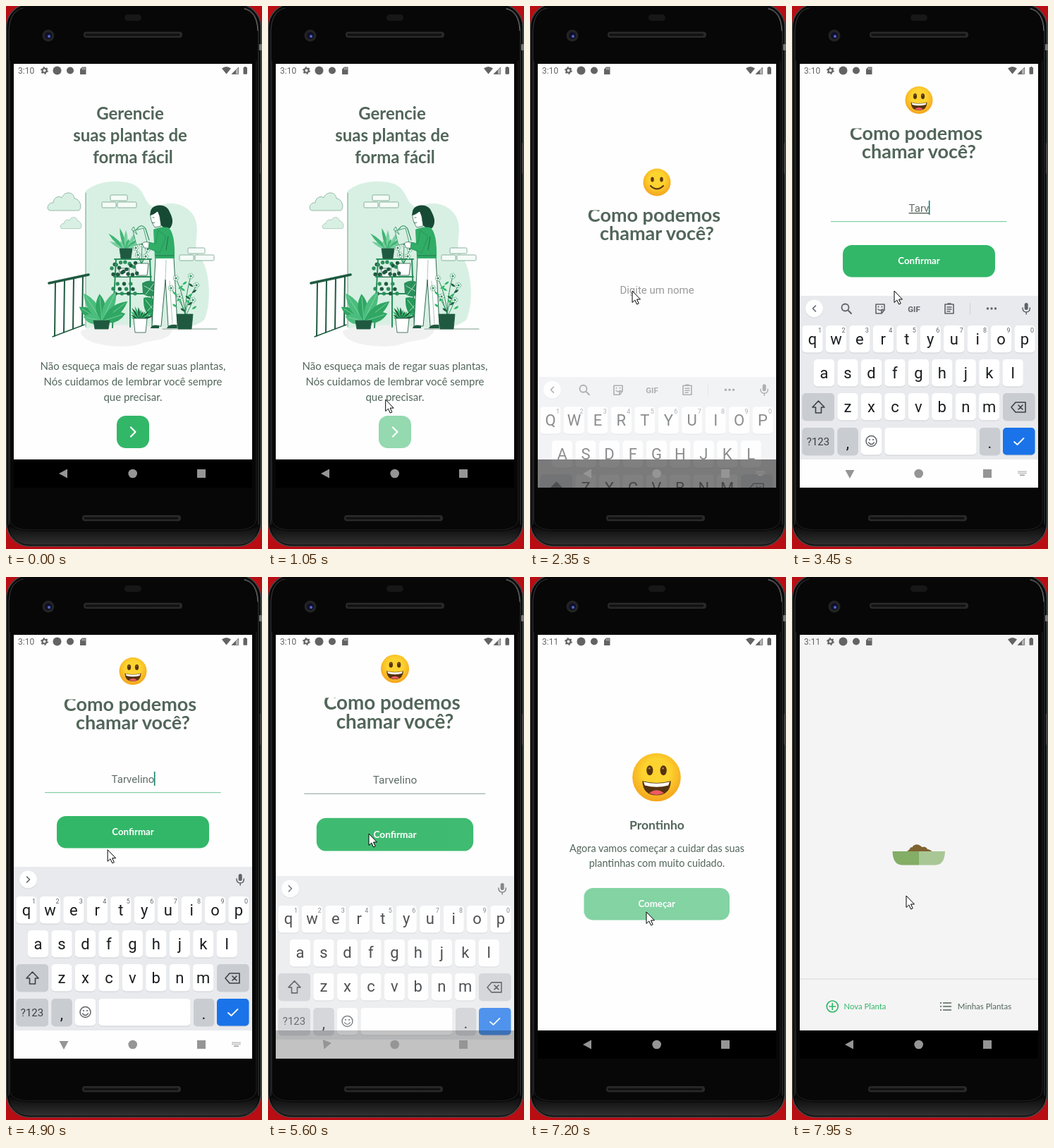
Write an HTML page that moves like this. It is 363 px wide and 770 px high and loops after 8000 ms.

```html
<!DOCTYPE html>
<html lang="pt">
<head>
<meta charset="utf-8">
<title>Plantas</title>
<style>
  html, body { margin: 0; width: 100%; height: 100%; overflow: hidden; background: #b90d14; }
  svg { display: block; width: 100vw; height: 100vh; }
  text { font-family: Lato, "Open Sans", sans-serif; text-anchor: middle; fill: #52665a; white-space: pre; }
  .title { font-weight: 700; }
  .label { font-weight: 700; font-size: 13.3px; fill: #fff; }
  .roboto { font-family: Roboto, Arial, sans-serif; }
  .key { font-size: 22px; fill: #1b1c1e; }
  .line { fill: none; stroke-linecap: round; stroke-linejoin: round; }
</style>
</head>
<body>
<svg id="stage" viewBox="0 0 363 770" preserveAspectRatio="none"></svg>
<script>
const LOOP = 8000, CENTER = '180 362.5', RESIZE = 116;
const GREEN = '#32b768', DARK = '#1f5a40', MID = '#2b8f5b', PALE = '#d8f0e3';
const NAME = 'Tarvelino';
const KEY_TIMES = [3000, 3150, 3300, 3450, 3650, 3800, 3950, 4150, 4350];
const POINTER = [[0, 20, -22], [50, 20, -22], [450, 105, 290], [750, 174, 596], [950, 174, 598],
  [1350, 145, 440], [1600, 145, 404], [4750, 145, 404], [5100, 143, 364], [5680, 143, 364],
  [5950, 136, 422], [6080, 136, 422], [6250, 150, 494], [6400, 163, 477], [6550, 165, 475],
  [7200, 165, 475], [7500, 162, 452], [8000, 162, 452]];

const range = n => [...Array(n).keys()];
const rect = (x, y, w, h, r, fill, extra = '') =>
  `<rect x="${x}" y="${y}" width="${w}" height="${h}" rx="${r}" fill="${fill}" ${extra}/>`;
const circle = (x, y, r, fill, extra = '') => `<circle cx="${x}" cy="${y}" r="${r}" fill="${fill}" ${extra}/>`;
const fill = (d, color, extra = '') => `<path d="${d}" fill="${color}" ${extra}/>`;
const stroke = (d, color, width = 1, extra = '') =>
  `<path class="line" d="${d}" stroke="${color}" stroke-width="${width}" ${extra}/>`;
const text = (x, y, size, content, cls = '', extra = '') =>
  `<text x="${x}" y="${y}" font-size="${size}" class="${cls}" ${extra}>${content}</text>`;
const leaf = (x, y, angle, length, width, color) =>
  fill(`M0 0Q${width} ${-length / 2} 0 ${-length}Q${-width} ${-length / 2} 0 0Z`, color,
    `transform="translate(${x} ${y}) rotate(${angle})"`);
const page = color => rect(11, 82, 338, 561, 0, color);

function button(id, x, width, y, label) {
  return `<g id="${id}">${rect(x, y, width, 45.5, 13, GREEN)}${text(x + width / 2, y + 27, 13.3, label, 'label')}</g>`;
}

function pot(x, y, w, h, color) {
  return fill(`M${x} ${y}h${w}l-2 ${h}h${4 - w}Z`, color, `stroke="${DARK}" stroke-width=".8"`);
}

function flowers(points) {
  return points.map(([x, y]) => range(5).map(i => {
    const a = i * 1.257;
    return circle(x + 2.4 * Math.cos(a), y + 2.4 * Math.sin(a), 1.7, '#fff', `stroke="${MID}" stroke-width=".5"`);
  }).join('') + circle(x, y, 1.2, MID)).join('');
}

function bricks(x, y) {
  return [[12, 0, 24], [0, 10, 20], [22, 10, 27]].map(([dx, dy, w]) =>
    rect(x + dx, y + dy, w, 8, 1.5, '#f5fcf8', 'stroke="#6f9d87" stroke-width=".8"')).join('');
}

function cloud(x, y, s) {
  return fill('M3 26C-3 24 1 14 8 15C9 6 17 5 20 8C24-2 37-1 38 9C46 9 50 23 44 26Z', PALE,
    `transform="translate(${x} ${y}) scale(${s})" stroke="#7eaa95" stroke-width=".8"`);
}

function illustration() {
  const rail = [70, 83, 96, 109].map(x =>
    stroke(`M${x} ${393 - (x - 62) * .22}L${x - 1} ${468 - (x - 70) * .4}`, DARK, 2)).join('');
  const stems = [[234, 400], [241, 386], [262, 383], [270, 396], [246, 412], [265, 417]];
  const daisies = [[184, 343], [193, 338], [201, 345], [187, 353], [198, 355]];
  return [
    fill('M113 262C130 248 158 246 178 252C200 260 194 284 214 286C235 272 266 284 270 308C274 330 262 340 278 360C290 380 291 425 281 445C265 460 230 458 113 457Z', PALE),
    fill('M106 461C130 448 200 452 236 458C232 477 206 472 188 480C160 487 106 480 106 461Z', '#f0f1f0'),
    stroke('M113 265V455', '#6f9d87', 1),
    cloud(59, 264, 1), cloud(77, 299, .64), bricks(136, 268), bricks(246, 343),
    stroke('M61 393L117 381', DARK, 3.6), rail, stroke('M66 469L111 452', DARK, 1.4),
    stroke('M222 458H299', '#7c9b8b', 1),
    // shelf with its plants
    stroke('M154 359H206M153 384H206M154 408H206M156 359L151 456M204 359L208 456M176 384V455', MID, 2),
    range(9).map(i => leaf(170, 346, -62 + i * 15.5, 26 + 11 * Math.sin(i * 2.3), 5, i % 2 ? '#3fb573' : '#78cfa0')).join(''),
    pot(161, 344, 18, 14, DARK),
    daisies.map(([x, y]) => stroke(`M192 366L${x} ${y}`, MID, .9)).join(''), flowers(daisies),
    pot(183, 365, 19, 17, '#fff'),
    pot(160, 372, 15, 12, '#fff'),
    range(18).map(i => circle(150 + i * 2.1, 372 + 9 * Math.sin(i * 1.9), 2.7, i % 3 ? DARK : MID)).join(''),
    range(11).map(i => circle(152 + i * 3.1, 401 + 8 * Math.sin(i * 2.1), 2.7, i % 2 ? DARK : MID)).join(''),
    // large foliage
    [[-58, 38], [-33, 47], [-5, 39], [25, 47], [52, 46], [-76, 27], [72, 35]].map(([a, l], i) =>
      leaf(136, 447, a, l, 14, i % 2 ? '#4bbd7d' : '#2fa763') +
      stroke(`M0 0V${-l + 5}`, '#91d9b2', .7, `transform="translate(136 447) rotate(${a})"`)).join(''),
    pot(124, 446, 23, 12, DARK),
    fill('M193 393Q203 386 214 393L213 408Q205 416 194 408Z', MID),
    fill('M195 414Q207 410 216 423Q218 438 207 440Q194 436 195 414Z', '#27995a'),
    stroke('M196 397L212 406M210 393L198 409M198 417L213 436M213 419L201 432', '#a7dfc0', 1),
    range(12).map(i => leaf(190, 445, -75 + i * 13.5, 13 + 8 * Math.sin(i * 2.7) ** 2, 3, i % 2 ? DARK : GREEN)).join(''),
    pot(181, 443, 19, 20, '#fff'),
    // gardener
    fill('M205 296C202 282 222 278 230 288C234 296 239 304 234 313C230 320 220 314 217 306Z', '#174a35'),
    fill('M205 294Q208 289 217 292L220 312L211 314Q204 304 205 294Z', '#fff', `stroke="${DARK}" stroke-width=".7"`),
    fill('M204 297Q207 283 220 285Q227 289 224 304Q217 299 215 291Q210 296 204 297Z', '#174a35'),
    stroke('M208 300h2M207 307q2 2 4 0', DARK, .8),
    fill('M212 357H238L243 454H230L226 388L220 454H207Z', '#fff', `stroke="${DARK}" stroke-width=".9"`),
    stroke('M227 360L226 388M232 390L236 451', '#8fa99c', .7),
    fill('M205 457Q206 451 217 453V457ZM228 457Q230 451 242 452L243 457Z', DARK),
    fill('M180 319L195 315L200 335L185 339ZM186 324L178 317L181 313Z', PALE, `stroke="${MID}" stroke-width=".8"`),
    stroke('M185 317Q192 307 198 316L203 332', MID, 1.2),
    fill('M193 337Q197 332 207 337L209 344L196 343Z', '#fff', `stroke="${DARK}" stroke-width=".7"`),
    fill('M209 317Q219 312 230 314Q240 321 239 358H211Z', '#30ad66'),
    fill('M216 318L212 337L203 335L202 344L218 350L227 327Z', '#30ad66', `stroke="${MID}" stroke-width=".8"`),
    stroke('M212 354H238M230 327L227 346', DARK, .7),
    // flower bush
    stems.map(([x, y]) => stroke(`M254 437Q${254 + (x - 254) * .1} ${y + 25} ${x} ${y}`, MID, 1)).join(''),
    range(14).map(i => leaf(254 + 12 * Math.sin(i * 2.2), 433 - i * 2.9, i % 2 ? 55 : -55, 8, 3, i % 3 ? GREEN : DARK)).join(''),
    flowers(stems), pot(242, 437, 23, 21, DARK)
  ].join('');
}

function smile() {
  return circle(0, 0, 19.5, 'url(#skin)') + stroke('M-9 5Q0 14 9 5', '#5d3a12', 2.2) +
    `<ellipse cx="-6.5" cy="-4" rx="2.3" ry="3.4" fill="#5d3a12"/><ellipse cx="6.5" cy="-4" rx="2.3" ry="3.4" fill="#5d3a12"/>`;
}

function grin() {
  const mouth = 'M-11.5 3Q0 6 11.5 3Q11 14.5 0 14.5Q-11 14.5 -11.5 3Z';
  return circle(0, 0, 19.5, 'url(#skin)') + fill(mouth, '#55330f') +
    fill('M-10.5 3.7Q0 6.2 10.5 3.7L9.5 6.5Q0 9 -9.5 6.5Z', '#fff') + fill('M-6 12.8Q0 8 6 12.8Q0 15.5 -6 12.8Z', '#ee5b62') +
    [-5.5, 5.5].map(x => `<ellipse cx="${x}" cy="-5.5" rx="2.6" ry="4" fill="#55330f"/>`).join('') +
    circle(-5.8, -7.2, .8, '#a9804a') + circle(5.2, -7.2, .8, '#a9804a');
}

function keyboard() {
  const INK = '#5f6368', SPECIAL = '#c9ccd1';
  const cap = (x, y, w, color = '#fff') => rect(x, y + 1, w, 38.5, 5, '#cdd0d4') + rect(x, y, w, 38.5, 5, color);
  const row = (letters, x, y) => [...letters].map((c, i) => cap(x + i * 33.45 - 14.6, y, 29.2) +
    text(x + i * 33.45, y + 26.5, 22, c, 'roboto key letter')).join('');
  const digits = range(10).map(i => text(39.5 + i * 33.45, 463, 9, (i + 1) % 10, 'roboto', `style="fill:${INK}"`)).join('');
  const tools = stroke('M80 432L84 436', INK, 2) + circle(75.5, 427.5, 5, 'none', `stroke="${INK}" stroke-width="1.8"`) +
    stroke('M119 423H131V431L127 436H119ZM127 436V431H131M122 430Q125 433 128 430', INK, 1.6) +
    circle(122.5, 426.5, 1, INK) + circle(127.5, 426.5, 1, INK) +
    text(173, 433.5, 11.5, 'GIF', 'roboto title', `style="fill:${INK}"`) +
    stroke('M217 423H229V436H217ZM221 422H225M220 427H226M220 430H226M220 433H224', INK, 1.6) +
    rect(252, 421, 1, 17, 0, '#cfd2d6') + [277.5, 283, 288.5].map(x => circle(x, 429, 1.7, INK)).join('');
  return rect(11, 411, 338, 232, 0, '#e8eaed') + circle(31.5, 429.7, 12.8, '#d3d6da') + circle(31.5, 429, 12.5, '#fff') +
    `<path id="chevron" class="line" d="M33.5 425L29.5 429L33.5 433" stroke="${INK}" stroke-width="1.6"/>` +
    `<g id="tools">${tools}</g>` + rect(329.7, 421, 5, 10, 2.5, INK) + stroke('M327 428Q327 434 332.2 434Q337.4 434 337.4 428M332.2 434V437', INK, 1.5) +
    row('qwertyuiop', 29, 453) + digits + row('asdfghjkl', 45.6, 501) + row('zxcvbnm', 79, 549) +
    cap(14.5, 549, 45.5, SPECIAL) + `<path id="shift" d="M37.5 560L46 569H41.5V577H33.5V569H29Z" stroke="#3c4043" stroke-width="1.6" stroke-linejoin="round"/>` +
    cap(299, 549, 45.5, SPECIAL) + stroke('M311 569L317 562H331V576H317ZM321 566L327 572M327 566L321 572', '#3c4043', 1.6) +
    cap(14.5, 598, 45.5, SPECIAL) + text(37, 622.5, 15, '?123', 'roboto', 'style="fill:#3c4043"') +
    cap(64.5, 598, 29.2, SPECIAL) + text(79, 627, 19, ',', 'roboto key') +
    cap(98, 598, 29.2) + circle(112.5, 617, 7.5, 'none', `stroke="${INK}" stroke-width="1.5"`) +
    circle(110, 615, 1.1, INK) + circle(115, 615, 1.1, INK) + stroke('M108.5 619Q112.5 624 116.5 619', INK, 1.4) +
    cap(131.5, 598, 130) + cap(266, 598, 29.2, SPECIAL) + text(280.5, 627, 19, '.', 'roboto key') +
    cap(299, 598, 45.5, '#1a73e8') + stroke('M315 618L319.5 622L328.5 613', '#fff', 1.8);
}

function phoneBody() {
  const speaker = y => rect(0, y, 140, 8.5, 4, '#292929') + stroke(`M4 ${y + 4.2}H136`, '#111', 3.5, 'stroke-dasharray="1 2.6"');
  return rect(0, 0, 363, 770, 0, '#b90d14') +
    rect(.5, -3, 361, 769, 33, '#070707', 'stroke="#454545" stroke-width="1.6"') +
    fill('M3 735Q6 763 34 764H329Q356 763 359 735Q352 744 325 745H38Q10 744 3 735Z', 'url(#chin)') +
    stroke('M5.5 78V728Q7 743 34 743H327Q353 743 355 728V78', '#222', 1) +
    stroke('M24 3Q5 7 4 36V735M338 3Q357 7 358 36V735', '#343434', 1.2) +
    stroke('M338 4Q356 8 357 35', '#777', 1) + rect(359, 54, 4, 9, 1, '#777') + rect(360, 194, 3, 44, 1, '#444') +
    rect(168, 12, 24, 9, 4.5, '#171717') + circle(60, 42, 8.5, '#232323') + circle(60, 42, 5, '#10102a') + circle(61, 43, 2, '#5367c8') +
    `<g transform="translate(110)">${speaker(36.5)}</g><g transform="translate(108)">${speaker(722)}</g>`;
}

function statusBar() {
  const INK = '#636363';
  return text(17, 96, 12, '3:10', 'roboto', `id="clock" style="text-anchor:start;fill:${INK}"`) +
    circle(54.5, 91.5, 3, 'none', `stroke="${INK}" stroke-width="2.2"`) +
    circle(54.5, 91.5, 4.6, 'none', `stroke="${INK}" stroke-width="1.6" stroke-dasharray="2.2 2.6"`) +
    circle(72.5, 91.5, 6, INK) + circle(91, 91.5, 5, INK) +
    fill('M108 86.5H113.5V97H105V89.5Z', INK) + stroke('M108.3 88V90M110 88V90M111.8 88V90', '#ddd', .8) +
    fill('M306 88.5Q312.5 83.5 319 88.5L312.5 96.5Z', INK) + fill('M320 96.5L330 86.5V96.5Z', '#b5b5b5') + fill('M320 96.5L326 90.5V96.5Z', INK) + stroke('M320.5 96.2L329.7 87V96.2Z', INK, .7) +
    rect(336.5, 87, 5.5, 9.8, 1, INK) + rect(338, 86, 2.5, 2, 0, INK);
}

const stage = document.getElementById('stage');
stage.innerHTML = `
<defs>
  <radialGradient id="skin" cx=".5" cy=".4" r=".62"><stop offset=".45" stop-color="#fdd32f"/><stop offset="1" stop-color="#f4a11d"/></radialGradient>
  <linearGradient id="chin" x2="0" y2="1"><stop stop-color="#080808"/><stop offset="1" stop-color="#303030"/></linearGradient>
  <clipPath id="appClip"><rect id="appWindow" x="11" y="82" width="338" height="561"/></clipPath>
  <clipPath id="screenClip"><rect x="11" y="82" width="338" height="601"/></clipPath>
  <clipPath id="titleClip"><rect x="60" y="289.5" width="240" height="60"/></clipPath>
</defs>
${phoneBody()}
${rect(11, 82, 338, 601, 0, '#000')}
${page('#fefefe')}
<g clip-path="url(#appClip)">
  <g id="welcome">${page('#fefefe')}
    ${text(176, 161, 24, 'Gerencie', 'title')}${text(176, 192, 24, 'suas plantas de', 'title')}${text(180, 223, 24, 'forma fácil', 'title')}
    ${illustration()}
    ${text(180, 516, 15, 'Não esqueça mais de regar suas plantas,')}${text(180, 538, 15, 'Nós cuidamos de lembrar você sempre')}${text(180, 559.5, 15, 'que precisar.')}
    <g id="next">${rect(157, 581, 46, 46, 13, GREEN)}${stroke('M177 597.5L183.5 604L177 610.5', '#fff', 2.2)}</g>
  </g>
  <g id="form">${page('#fefefe')}
    <g id="calm" transform="translate(180 250)">${smile()}</g><g id="happy" transform="translate(180 249.5)">${grin()}</g>
    <g clip-path="url(#titleClip)">${text(176, 306, 27, 'Como podemos', 'title')}${text(180, 332, 27, 'chamar você?', 'title')}</g>
    ${text(180, 408, 15, '', 'roboto', 'id="field"')}
    ${rect(0, 392, 1.6, 20, 0, '#12806c', 'id="caret"')}
    ${rect(55, 421, 249.5, 1.2, 0, '#ddd', 'id="underline"')}
    ${button('confirm', 72, 216, 455, 'Confirmar')}
  </g>
  <g id="done">${page('#fefefe')}
    <g transform="translate(179.5 284) scale(1.76)">${grin()}</g>
    ${text(180, 358, 17.5, 'Prontinho', 'title')}
    ${text(180, 390.5, 14.4, 'Agora vamos começar a cuidar das suas')}${text(180, 411, 14.4, 'plantinhas com muito cuidado.')}
    ${button('start', 76.5, 206.5, 441, 'Começar')}
  </g>
  <g id="home">${page('#f4f4f4')}
    <g id="soil">${fill('M162 389.5Q167 387 168 383.5Q171 384 172 381Q177 377.5 182 381Q184 384 187 382.5Q191 383 192 386Q197 387 199 389.5Z', '#806130')}</g>
    <g id="planter">${fill('M142.5 389H180V408.5H156Q143 408 142.5 389Z', '#84ad66')}${fill('M180 389H217Q216.5 408 203.5 408.5H180Z', '#a9c795')}</g>
    ${rect(11, 569.5, 338, 1.2, 0, '#dedede')}
    ${circle(57.3, 609, 8, 'none', `stroke="${GREEN}" stroke-width="1.7"`)}${stroke('M53 609H61.6M57.3 604.7V613.3', GREEN, 1.7)}
    ${text(103.5, 612.5, 11.3, 'Nova Planta', '', `style="fill:${GREEN}"`)}
    ${[604, 609, 614].map(y => circle(211, y, 1.1, '#52665a') + stroke(`M214.5 ${y}H225.5`, '#52665a', 1.5)).join('')}
    ${text(273, 612.5, 11.5, 'Minhas Plantas')}
  </g>
</g>
${statusBar()}
<g clip-path="url(#screenClip)">
  <g id="ime">${rect(11, 411, 338, 272, 0, '#fefefe')}<g id="keys">${keyboard()}</g>${rect(11, 643, 338, 40, 0, '#000', 'id="navShade"')}</g>
</g>
<g fill="#959595">
  <path id="back" d="M75 663L87 656.5V669.5Z"/><circle cx="179.7" cy="663" r="6.3"/><rect x="271" y="657" width="12" height="12"/>
  <g id="imeSwitch">${range(12).map(i => rect(320.5 + i % 6 * 2.1, 659.5 + (i / 6 | 0) * 2.3, 1.3, 1.4, 0, '#959595')).join('')}${rect(323, 664.5, 7, 1.4, 0, '#959595')}</g>
</g>
<path id="pointer" d="M0 0V16.5L3.8 13L6.6 19L9.2 17.8L6.5 12H11.5Z" fill="#fff" stroke="#000" stroke-width="1"/>`;

const ui = Object.fromEntries([...stage.querySelectorAll('[id]')].map(e => [e.id, e]));
const letters = [...stage.querySelectorAll('.letter')];
const set = (node, attrs) => { for (const k in attrs) node.setAttribute(k, attrs[k]); };
const show = (node, visible) => node.setAttribute('display', visible ? 'inline' : 'none');
const ramp = (t, from, to) => Math.min(1, Math.max(0, (t - from) / (to - from)));

// cubic-bezier(.4, 0, .2, 1)
function fastOutSlowIn(x) {
  let lo = 0, hi = 1, s = .5;
  for (let i = 0; i < 16; i++) {
    s = (lo + hi) / 2;
    const bx = 1.2 * (1 - s) ** 2 * s + .6 * (1 - s) * s * s + s ** 3;
    if (bx < x) lo = s; else hi = s;
  }
  return 3 * (1 - s) * s * s + s ** 3;
}

// Pages enter from 0.85 and leave towards 1.15.
function placePage(node, entering, leaving, dy) {
  const scale = .85 + .15 * entering + .15 * leaving;
  const opacity = ramp(entering, .75, .875) * (1 - ramp(leaving, .2, 1));
  show(node, opacity > 0);
  set(node, { opacity, transform: `translate(0 ${dy}) translate(180 362.5) scale(${scale}) translate(-180 -362.5)` });
}

const pressed = (t, down, up) => 1 - .8 * ramp(t, down, down + 120) * (1 - ramp(t, up, up + 230));

function pointerAt(t) {
  const i = Math.max(1, POINTER.findIndex(p => p[0] > t));
  const [t0, x0, y0] = POINTER[i - 1], [t1, x1, y1] = POINTER[i];
  let k = ramp(t, t0, t1);
  return [x0 + (x1 - x0) * k, y0 + (y1 - y0) * k];
}

function drawForm(t) {
  const typed = NAME.slice(0, KEY_TIMES.filter(k => t >= k).length);
  const content = typed || 'Digite um nome';
  if (ui.field.textContent !== content) ui.field.textContent = content;
  ui.field.style.fill = typed ? '#5f6d66' : '#9a9a9a';
  ui.field.style.textDecoration = typed && t < 4500 ? 'underline 1px' : 'none';
  show(ui.calm, !typed);
  show(ui.happy, typed);
  const focused = t >= 1850 && t < 5300;
  set(ui.underline, { fill: focused ? '#84cda5' : typed ? '#9db3aa' : '#dedede' });
  show(ui.caret, focused && (t >= 3000 && t < 4850 || Math.floor((t - 1850) / 500) % 2 === 0));
  set(ui.caret, { x: 179.5 + (typed ? ui.field.getComputedTextLength() / 2 : 0) });
}

function drawKeyboard(t) {
  const opening = t < 4000;
  const hidden = opening ? 1 - ramp(t, 2200, 2500) : ramp(t, 5555, 5750);
  show(ui.ime, hidden < 1);
  set(ui.keys, { opacity: 1 - hidden, transform: `translate(0 ${232 * (opening ? hidden : hidden ** 2)})` });
  set(ui.navShade, { opacity: hidden });
  const upper = t < KEY_TIMES[0];
  letters.forEach(e => {
    const c = upper ? e.textContent.toUpperCase() : e.textContent.toLowerCase();
    if (e.textContent !== c) e.textContent = c;
  });
  set(ui.shift, { fill: upper ? '#3c4043' : 'none' });
  const suggesting = t >= 3600;
  show(ui.tools, !suggesting);
  set(ui.chevron, { transform: suggesting ? 'rotate(180 31.5 429)' : '' });
  show(ui.imeSwitch, t >= 2300 && t < 5560);
  const turn = opening ? ramp(t, 2550, 2850) : 1 - ramp(t, 5555, 5750);
  set(ui.back, { transform: `rotate(${-90 * turn} 82 663)` });
}

function draw(t) {
  const [toForm, toDone, toHome] = [1070, 5508, 7200].map(start => fastOutSlowIn(ramp(t, start, start + 400)));
  const dy = t >= 2450 && t < 5700 ? -RESIZE : 0;
  set(ui.appWindow, { height: t >= 2200 && t < 5700 ? 329 : 561 });
  placePage(ui.welcome, 1, toForm, 0);
  placePage(ui.form, toForm, toDone, dy);
  placePage(ui.done, toDone, toHome, dy);
  placePage(ui.home, toHome, 0, 0);
  set(ui.next, { opacity: pressed(t, 780, 960) });
  set(ui.confirm, { opacity: pressed(t, 5050, 5390) });
  set(ui.start, { opacity: t >= 6700 ? .6 : 1 });
  drawForm(t);
  drawKeyboard(t);
  const grow = ramp(t, 7500, 7750);
  set(ui.planter, { transform: `translate(180 398) scale(${grow}) translate(-180 -398)` });
  set(ui.soil, { transform: `translate(180 389.5) scale(${ramp(t, 7700, 7930)}) translate(-180 -389.5)` });
  ui.clock.textContent = t < 6300 ? '3:10' : '3:11';
  set(ui.pointer, { transform: `translate(${pointerAt(t)})` });
}

function tick() {
  draw(performance.now() % LOOP);
  requestAnimationFrame(tick);
}
tick();
</script>
</body>
</html>
```
